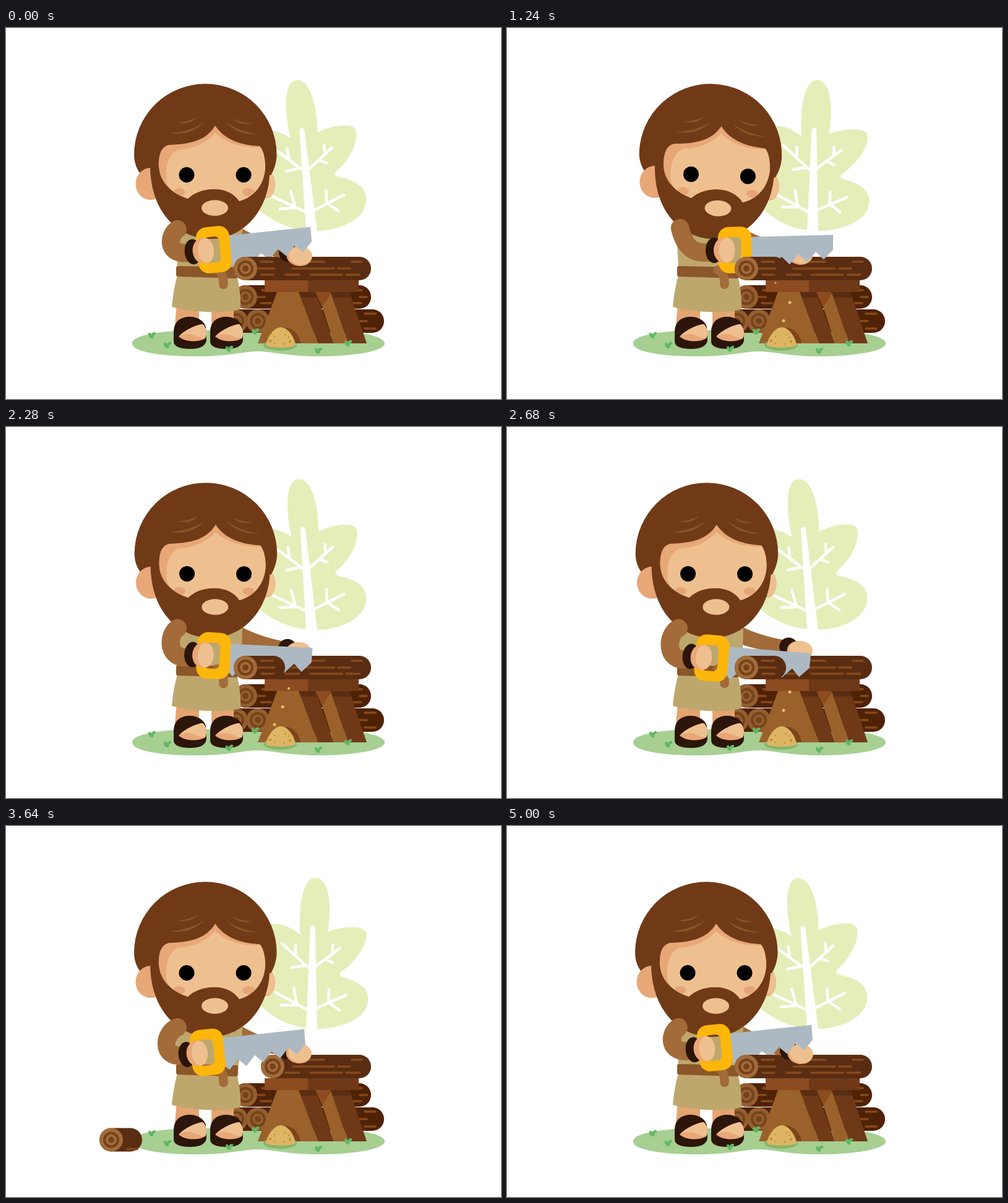
An HTML page with a canvas for the animation above (5040 ms loop, 800 px wide and 600 px high).

```html
<!DOCTYPE html>
<html lang="en">
<head>
<meta charset="utf-8">
<title>Carpenter</title>
<style>
html, body { margin: 0; width: 100%; height: 100%; overflow: hidden; background: #fff; }
canvas { display: block; }
</style>
</head>
<body>
<canvas id="stage" width="800" height="600"></canvas>
<script>
const ctx = document.getElementById('stage').getContext('2d');
const LOOP = 5040, STEP = 40, TAU = Math.PI * 2;
const C = {
  hair: '#703a17', skin: '#efc08f', shade: '#e8a777', tunic: '#bea76d', sleeve: '#a26b39',
  belt: '#8b5629', band: '#2c1509', grip: '#fdb60a', blade: '#adb9c2', grass: '#a6cf91',
  tuft: '#60b765', leaf: '#e5eeb9', log: '#5a2d12', pile: '#4f2206', grain: '#87491c',
  disc: '#a26b39', pileDisc: '#935e30', ring: '#764219', plank: '#8d4b20', wood: '#9a612b',
  dark: '#6f3917', dust: '#deb562'
};

const clamp = x => Math.max(0, Math.min(1, x));
const ease = x => { x = clamp(x); return x * x * (3 - 2 * x); };
const mix = (a, b, k) => a + (b - a) * k;
const radians = deg => deg * Math.PI / 180;

// Each key is [time, ...values].
function keyed(keys, t) {
  let i = 0;
  while (i < keys.length - 2 && t >= keys[i + 1][0]) i++;
  const a = keys[i], b = keys[i + 1];
  const k = ease((t - a[0]) / (b[0] - a[0]));
  return a.slice(1).map((v, n) => mix(v, b[n + 1], k));
}

function fill(path, color) {
  ctx.fillStyle = color;
  ctx.fill(typeof path === 'string' ? new Path2D(path) : path);
}
function stroke(path, color, width) {
  ctx.strokeStyle = color;
  ctx.lineWidth = width;
  ctx.lineCap = ctx.lineJoin = 'round';
  ctx.stroke(new Path2D(path));
}
function oval(x, y, rx, ry, color, turn = 0) {
  ctx.beginPath();
  ctx.ellipse(x, y, rx, ry, turn, 0, TAU);
  ctx.fillStyle = color;
  ctx.fill();
}
function box(x, y, w, h, r, color) {
  ctx.beginPath();
  ctx.roundRect(x, y, w, h, r);
  ctx.fillStyle = color;
  ctx.fill();
}
function at(x, y, turn, draw) {
  ctx.save();
  ctx.translate(x, y);
  ctx.rotate(turn);
  draw();
  ctx.restore();
}

function drawLeaf(t) {
  const sway = -0.04 - 0.5 * Math.cos(t / 2520 * TAU);
  const bend = path => path.replace(/([\d.]+),([\d.]+)/g, (_, px, py) => {
    const x = +px, h = Math.max(0, 327 - py) / 243;
    return (x + sway * 32 * h ** 1.4) + ',' + (+py + sway * 0.12 * h ** 0.4 * (x - 492));
  });
  fill(bend('M488,327C455,325 428,308 411,293C390,270 395,210 405,170C425,154 449,162 469,177' +
    'C463,140 464,84 487,84C509,84 516,128 513,170C535,160 575,155 575,172' +
    'C577,194 555,222 537,235Q534,239 539,242C557,247 584,254 584,279C582,315 533,328 502,328Z'), C.leaf);
  fill(bend('M484,166C484,160 492,160 492,166L503,329L485,329Z'), '#fff');
  stroke(bend('M490,232L534,196M522,191L522,206M512,215L524,220M489,233L440,192M462,194L463,211' +
    'M458,230L481,226M490,299L548,272M520,264L520,284L538,297M489,299L434,271M463,263L469,290L444,291'), '#fff', 4.5);
}

function drawGround() {
  fill('M204,510C204,496 255,489 308,489L505,489C562,489 612,497 612,510C612,523 560,531 505,531' +
    'C455,531 430,523 406,523C385,523 360,531 308,531C250,531 204,524 204,510Z', C.grass);
}
function drawTufts(t) {
  const lean = 0.1 * Math.sin(t / 2520 * TAU);
  for (const [x, y] of [[236, 497], [261, 513], [361, 519], [403, 491], [505, 522], [553, 510]])
    at(x, y, lean, () => stroke('M0,3Q-3,2 -4,-2M0,3Q0,-2 4,-3', C.tuft, 4.4));
}

function drawDisc(x, y, color) {
  oval(x, y, 19, 19, color);
  ctx.beginPath();
  ctx.arc(x, y, 11, 0, TAU);
  ctx.strokeStyle = C.ring;
  ctx.lineWidth = 4;
  ctx.stroke();
  oval(x, y, 5, 5, C.ring);
}
function drawLog(x, right, y, grain, color = C.log, disc = C.disc) {
  box(x - 19, y - 19, right - x + 19, 38, 19, color);
  stroke(grain, C.grain, 3.6);
  drawDisc(x, y, disc);
}
function drawPile() {
  drawLog(372, 450, 474, '', C.pile, C.pileDisc);
  drawLog(407, 611, 474, 'M580,462H597M571,474H583M580,486H597', C.pile, C.pileDisc);
  drawLog(387, 590, 435, 'M414,424H430M407,435H418M412,445H428M560,424H575M572,435H583M560,445H574',
    C.pile, C.pileDisc);
}
function drawLongLog(y) {
  at(0, y, 0, () => drawLog(431, 590, 389,
    'M467,378H514M559,378H575M463,389H530M537,389H556M452,399H474M492,399H543M550,399H571'));
}
function drawPiece(x, y, width, rolled) {
  at(x, y, 0, () => drawLog(0, width - 19, 0, rolled ? 'M26,15H42' : 'M25,-11H44M20,0H47M26,10H45'));
}

function drawBench() {
  fill('M473,427H500L530,510H504ZM525,427H555L583,510H553Z', C.dark);
  fill('M438,427H473L504,510H407Z', C.wood);
  fill('M525,428L553,510H530L511,451Z', C.wood);
  fill('M500,427H525L511,452Z', C.plank);
  fill('M473,427H500L503,436H477ZM525,427H555L558,436H528Z', C.log);
  box(418, 408, 70, 19, 0, C.plank);
  box(488, 408, 82, 19, 0, C.dark);
  fill('M448,485C462,483 474,495 476,510H448Z', '#7d4519');
  oval(443, 513, 27, 9, '#86b46e');
  fill('M420,513C422,499 434,484 444,484C455,484 466,499 468,513C464,518 424,518 420,513Z', C.dust);
  for (const [x, y, r] of [[427, 506, 2.3], [434, 499, 1.3], [434, 510, 1.3], [451, 496, 1.3],
    [449, 511, 1.4], [459, 507, 2.2], [457, 500, 1.3]]) oval(x, y, r, r, '#be903f');
}

function drawFarArm([x, y, degrees]) {
  const turn = radians(degrees);
  const sx = 369, sy = 333;
  const bx = x - 20 * Math.cos(turn), by = y - 20 * Math.sin(turn);
  const len = Math.hypot(bx - sx, by - sy), nx = (by - sy) / len, ny = (sx - bx) / len;
  // Points across the arm, measured from its sagging centre line.
  const side = (along, out) => `${mix(sx, bx, along) + nx * out},${mix(sy, by, along) + ny * out}`;
  fill(`M${side(0, 14)}Q${side(0.5, 4)} ${side(1, 10)}L${side(1, -10)}Q${side(0.5, -20)} ${side(0, -14)}Z`, C.sleeve);
  oval(bx + Math.cos(turn), by + Math.sin(turn), 15, 15, C.band, turn);
  oval(x, y, 20.5, 16, C.shade, turn - 0.2);
  oval(x + 2, y - 1, 19, 15, C.skin, turn - 0.2);
}

function drawFoot(x) {
  at(x, 0, 0, () => {
    fill('M271,492C271,474 283,467 297,467C311,467 321,475 323,484L324,505C322,516 311,519 297,519' +
      'C281,519 271,515 271,507Z', C.band);
    fill('M279,499C285,491 306,480 318,479C325,485 325,497 322,502C310,509 289,508 279,499Z', C.shade);
    fill('M281,498C287,490 306,480 318,479C325,485 325,496 322,501C311,504 300,488 281,498Z', C.skin);
  });
}
function drawBody() {
  fill('M276,445H312V480H273ZM332,445H368V480H332Z', '#e4a470');
  drawFoot(0);
  drawFoot(59);
  fill('M284,318L382,320L381,357C378,370 376,382 375,396H277C277,375 275,352 274,340Z' +
    'M277,400C272,418 269,437 268,451C295,459 350,463 379,455C380,438 377,417 373,400Z', C.tunic);
  fill('M278,385L372,387Q375,387 375,390V401Q375,405 371,405L278,402Q275,402 275,399V388Q275,385 278,385Z', C.belt);
  stroke('M341,391Q352,396 351.5,415', C.sleeve, 14.5);
}

function drawNearSleeve(x, y, stroked) {
  const dx = x - 319;
  const sx = 277 + stroked * 2.5, sy = 325.5 - stroked * 2;
  stroke(`M${sx},${sy}C${261 + dx * 0.7},${336 + dx * 0.15} ${260 + dx},${y + 9} ${x - 22},${y + 3}`,
    C.sleeve, 29.5);
}

const facePath = new Path2D('M247,225C246,203 252,191 264,189C300,188 324,181 338,158C354,182 383,190 410,191' +
  'C417,199 419,214 419,225C418,252 402,273 377,280C369,268 355,260.5 336,260.5C318,260.5 303,267 294,276' +
  'C267,267 249,250 247,225Z');
function drawHead(nod) {
  ctx.save();
  ctx.translate(322, 384);
  ctx.rotate(nod * 0.037);
  ctx.translate(-322, -384);
  oval(421, 253, 14, 22, C.shade);
  oval(423, 253, 12, 20, C.skin);
  fill('M207,205A115.25,114.8 0 0 1 437.5,205C437.5,217 433,230 428,238H219C211,229 207,217 207,205Z', C.hair);
  oval(234, 252, 24.5, 26, C.shade);
  fill('M233,222C233,300 280,341 331,341C385,341 427,292 426,230Z', C.hair);
  fill(facePath, C.shade);
  ctx.save();
  ctx.clip(facePath);
  fill('M259,245C258,216 265,205 277,197C303,196 325,185 338,170C360,190 388,194 412,193' +
    'L425,200V290H290V276C270,268 261,259 259,245Z', C.skin);
  oval(280, 265.5, 9.5, 6.5, '#e5a477');
  oval(392, 265.5, 10, 6.5, '#e5a477');
  ctx.restore();
  oval(292, 237.5, 12.5, 12.5, '#000');
  oval(384, 237.5, 12.5, 12.5, '#000');
  oval(337.5, 291, 21.5, 12.8, C.skin);
  fill('M266,170Q300,167 320,152Q299,175 266,170ZM278,153Q297,151 309,144Q298,157 278,153Z' +
    'M356,152Q375,168 409,172Q374,174 356,152ZM366,146Q380,154 398,154Q378,159 366,146Z', C.belt);
  ctx.restore();
}

function drawSaw() {
  let blade = 'M22,-20.5L159,-21';
  for (let k = 0; k < 5; k++)
    blade += `L${158.5 - 27.8 * k},${3 + 3.2 * k}L${143 - 27.7 * k},${18.7 + 3.3 * k}`;
  fill(blade + 'L22,22Z', C.blade);
  ctx.beginPath();
  ctx.roundRect(-27, -37.5, 54, 75, 17);
  ctx.roundRect(-15, -21, 25, 42, 7);
  ctx.fillStyle = C.grip;
  ctx.fill('evenodd');
}
function drawNearHand() {
  oval(-34, 0, 13.5, 20.5, C.band);
  oval(-18, 0, 16.5, 20.5, C.shade);
  oval(-13, 0, 13, 20, C.skin);
}

function drawDust(t) {
  if (t < 300 || t > 3150) return;
  for (const [x, offset] of [[457, 0.19], [434, 0.84], [447, 0.52]]) {
    const f = (t / 376 + offset) % 1, r = Math.min(2.5, 0.6 + f * 6);
    if (f < 0.92) oval(x, 400 + 90 * f, r, r, '#e6bd6b');
  }
}

// Grip centre and tilt in degrees.
const sawKeys = [
  [0, 336, 358.5, -5.75], [240, 336, 360, -2.5], [1240, 336.5, 361, -1.3], [1880, 337, 366, 1.3],
  [2680, 328, 374, 4.7], [3080, 326, 376, 5], [3640, 326, 366, -6], [4440, 336.5, 349, -14.2],
  [4920, 336, 358.5, -5.75], [LOOP, 336, 358.5, -5.75]
];
// Far hand centre and tilt in degrees.
const handKeys = [
  [0, 474, 369, 18], [1880, 473, 366, 18], [2680, 473, 362, 20], [3640, 473, 368, 18],
  [3840, 473, 368, 18], [4320, 398, 412, 55], [4520, 398, 412, 55], [4920, 474, 369, 18],
  [LOOP, 474, 369, 18]
];

function render(t) {
  ctx.fillStyle = '#fff';
  ctx.fillRect(0, 0, 800, 600);
  const stroked = t > 240 && t < 3040 ? (1 - Math.cos((t - 240) / 400 * TAU)) / 2 : 0;
  const [bx, by, angle] = keyed(sawKeys, t);
  const sx = bx + 32 * stroked, sy = by - 2 * stroked, turn = radians(angle);
  const hx = sx - 17 * Math.cos(turn), hy = sy - 17 * Math.sin(turn);
  const drop = 46 * (t < 4410 ? ease((t - 3880) / 420) : 1 - ease((t - 4520) / 380));
  const fresh = t >= 4520, lifting = fresh && t < 4900;

  drawLeaf(t);
  drawGround();
  drawLongLog(drop);
  if (lifting) drawPiece(387, 389 + drop, 83, false);
  drawPile();
  drawBench();
  drawFarArm(keyed(handKeys, t));
  drawBody();
  drawHead(stroked);
  drawNearSleeve(hx, hy, stroked);
  at(sx, sy, turn, () => { drawSaw(); drawNearHand(); });
  drawTufts(t);

  const rolling = t - 3206;
  if (rolling < 0 || (fresh && !lifting)) drawPiece(387, 389, 83, false);
  else if (!fresh) {
    const fall = clamp(rolling / 220);
    drawPiece(387 - rolling * 0.5, 389 + 118.5 * fall * fall, mix(83, 69, clamp(rolling / 120)), rolling > 100);
  }
  drawDust(t);
}

function tick() {
  render(Math.floor(performance.now() % LOOP / STEP) * STEP);
  requestAnimationFrame(tick);
}
tick();
</script>
</body>
</html>
```
